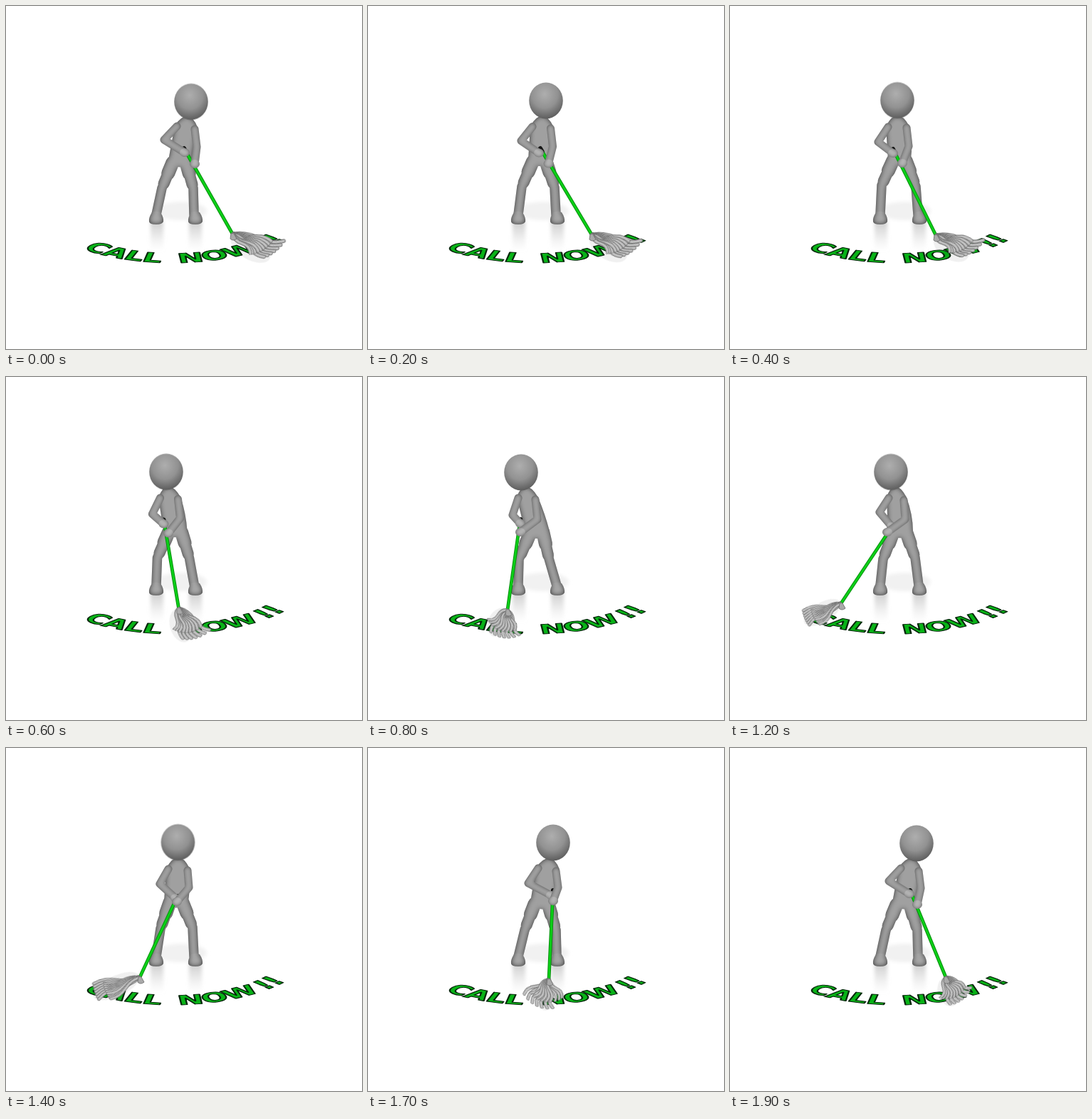
Animation of 500 by 482 pixels, one loop 2 s. Source, as an HTML page without scripts:

```html
<!DOCTYPE html>
<html lang="en">
<head>
<meta charset="utf-8">
<title>Call now</title>
<style>
html, body { margin: 0; width: 100%; height: 100%; overflow: hidden; background: #fff; }
svg { display: block; width: 100%; height: 100%; }
path { fill: none; stroke-linecap: round; stroke-linejoin: round; }

.floor { font: bold 44px "DejaVu Sans", sans-serif; fill: #08b317; stroke: #04260a; stroke-width: 2.4; stroke-linejoin: round; }

/* every 100 ms is one held pose */
.head, .mop, .handle { animation: 2s steps(2) infinite; }
.torso, .leg, .arm, .strand { animation: 2s steps(4) infinite; }

.solid { filter: url(#round); }
.torso { fill: #a0a0a0; stroke: #a0a0a0; stroke-width: 6; animation-name: torso; }
.leg { stroke: #a0a0a0; stroke-width: 13.5; }
.thigh { stroke-width: 16; stroke-dasharray: 32 200; }
.hip { stroke-width: 19; stroke-dasharray: 16 200; }
.leg.left { animation-name: legLeft; }
.leg.right { animation-name: legRight; }
.arm { stroke: #a0a0a0; stroke-width: 11; marker-end: url(#hand); filter: url(#roundArm); }
.arm.left { animation-name: armLeft; }
.arm.right { animation-name: armRight; }
.head { animation-name: head; }

.handle { stroke: #078a0c; stroke-width: 4.8; animation-name: handle; }
.handle.shine { stroke: #0bcf17; stroke-width: 3; }
.handle.grip { stroke: #151515; stroke-width: 6; stroke-dasharray: 5 400; }
.mop { animation-name: mop; }
.strand { animation-name: sweep; }

@keyframes head {
  0%, 100% { transform: translate(260px, 134.5px); }
  10% { transform: translate(250px, 133px); }
  20% { transform: translate(235px, 132.5px); animation-timing-function: steps(4); }
  40% { transform: translate(215px, 134px); }
  50% { transform: translate(218px, 134px); }
  60% { transform: translate(226px, 133.5px); }
  70% { transform: translate(241.5px, 132.5px); animation-timing-function: steps(3); }
  85% { transform: translate(260px, 133px); }
  95% { transform: translate(262px, 134px); animation-timing-function: steps(1); }
}
@keyframes mop {
  0%, 100% { transform: translate(318px, 320px); }
  10% { transform: translate(314px, 321px); }
  20% { transform: translate(289px, 322px); animation-timing-function: steps(4); }
  40% { transform: translate(196px, 327px); }
  50% { transform: translate(164px, 321px); }
  60% { transform: translate(156px, 318px); }
  70% { transform: translate(188px, 322px); animation-timing-function: steps(3); }
  85% { transform: translate(254px, 325px); }
  95% { transform: translate(303px, 322px); animation-timing-function: steps(1); }
}
@keyframes handle {
  0%, 100% { d: path("M250 200L318 320"); }
  10% { d: path("M242 200L314 321"); }
  20% { d: path("M229 201L289 322"); animation-timing-function: steps(4); }
  40% { d: path("M214 200L196 327"); }
  50% { d: path("M220 203L164 321"); }
  60% { d: path("M229 208L156 318"); }
  70% { d: path("M241 208L188 322"); animation-timing-function: steps(3); }
  85% { d: path("M260 200L254 325"); }
  95% { d: path("M253 200L303 322"); animation-timing-function: steps(1); }
}
/* --i is a strand's place in the fan, -1 to 1 */
@keyframes sweep {
  0%, 100% { transform: rotate(calc(26deg + var(--i) * 18deg)) scale(calc(.88 - var(--i) * .16), 1); }
  20% { transform: rotate(calc(26deg + var(--i) * 20deg)) scale(calc(.78 - var(--i) * .18), 1); }
  40% { transform: rotate(calc(105deg + var(--i) * 40deg)) scale(.56, .9); }
  60% { transform: rotate(calc(154deg - var(--i) * 15deg)) scale(.77, .8); animation-timing-function: steps(2); }
  70% { transform: rotate(calc(159deg - var(--i) * 13deg)) scale(.93, .85); animation-timing-function: steps(3); }
  85% { transform: rotate(calc(106deg - var(--i) * 43deg)) scale(.58, .9); animation-timing-function: steps(2); }
  95% { transform: rotate(calc(60deg + var(--i) * 37deg)) scale(.55, .9); animation-timing-function: steps(1); }
}
@keyframes torso {
  0%, 100% { d: path("M240 169Q256 146 266 171Q262 194 257 218Q243 229 231 217Z"); }
  20% { d: path("M222 170Q235 144 249 170Q254 192 251 215Q238 226 225 216Z"); }
  40% { d: path("M212 169Q221 145 236 170Q246 194 252 217Q238 230 224 218Z"); }
  60% { d: path("M223 169Q232 145 245 170Q254 194 254 217Q240 229 225 218Z"); animation-timing-function: steps(2); }
  70% { d: path("M228 170Q242 144 255 170Q256 194 253 216Q239 227 225 216Z"); animation-timing-function: steps(3); }
  85% { d: path("M239 169Q256 146 266 171Q263 194 257 218Q243 229 231 217Z"); animation-timing-function: steps(2); }
  95% { d: path("M240 169Q256 146 266 171Q262 194 257 218Q243 229 231 217Z"); animation-timing-function: steps(1); }
}
@keyframes legLeft {
  0%, 100% { d: path("M234 220L219 256L211 293"); }
  20% { d: path("M229 217L213 252L211 293"); }
  40% { d: path("M228 219L212 256L211 293"); }
  60% { d: path("M229 219L215 256L211 293"); animation-timing-function: steps(2); }
  70% { d: path("M230 217L217 254L211 293"); animation-timing-function: steps(3); }
  85% { d: path("M234 219L220 256L211 293"); animation-timing-function: steps(2); }
  95% { d: path("M234 220L219 256L211 293"); animation-timing-function: steps(1); }
}
@keyframes legRight {
  0%, 100% { d: path("M253 220L263 256L264 293"); }
  20% { d: path("M247 217L261 254L264 293"); }
  40% { d: path("M246 219L254 255L265 293"); }
  60% { d: path("M248 219L260 254L265 293"); animation-timing-function: steps(2); }
  70% { d: path("M248 217L262 252L264 293"); animation-timing-function: steps(3); }
  85% { d: path("M253 219L264 256L265 293"); animation-timing-function: steps(2); }
  95% { d: path("M253 220L263 256L264 293"); animation-timing-function: steps(1); }
}
@keyframes armLeft {
  0%, 100% { d: path("M240 169L222 188L251 206"); }
  20% { d: path("M222 170L208 191L229 207"); }
  40% { d: path("M211 170L203 194L214 206"); }
  60% { d: path("M223 170L210 190L227 210"); animation-timing-function: steps(2); }
  70% { d: path("M228 170L216 191L238 211"); animation-timing-function: steps(3); }
  85% { d: path("M239 169L225 190L257 207"); animation-timing-function: steps(2); }
  95% { d: path("M240 169L223 187L252 205"); animation-timing-function: steps(1); }
}
@keyframes armRight {
  0%, 100% { d: path("M265 173L268 198L265 222"); }
  20% { d: path("M248 171L251 197L242 221"); }
  40% { d: path("M235 172L238 200L214 218"); }
  60% { d: path("M244 173L246 200L221 218"); animation-timing-function: steps(2); }
  70% { d: path("M255 172L257 196L240 216"); animation-timing-function: steps(3); }
  85% { d: path("M264 173L267 196L260 215"); animation-timing-function: steps(2); }
  95% { d: path("M265 173L268 197L263 220"); animation-timing-function: steps(1); }
}
</style>
</head>
<body>
<svg viewBox="0 0 500 482">
  <defs>
    <radialGradient id="ball" cx=".46" cy=".32" r=".7">
      <stop offset="0" stop-color="#aeaeae"/>
      <stop offset=".55" stop-color="#929292"/>
      <stop offset="1" stop-color="#5a5a5a"/>
    </radialGradient>
    <linearGradient id="fade" x2="0" y2="1">
      <stop offset="0" stop-color="#bbb" stop-opacity=".75"/>
      <stop offset="1" stop-color="#ddd" stop-opacity="0"/>
    </linearGradient>
    <!-- darkens edges so flat limbs look round -->
    <filter id="round" filterUnits="userSpaceOnUse" x="185" y="100" width="115" height="215" color-interpolation-filters="sRGB">
      <feGaussianBlur in="SourceAlpha" stdDeviation="3.6"/>
      <feComponentTransfer><feFuncA type="table" tableValues=".8 .34 0"/></feComponentTransfer>
      <feComposite in2="SourceAlpha" operator="in" result="edge"/>
      <feMerge><feMergeNode in="SourceGraphic"/><feMergeNode in="edge"/></feMerge>
    </filter>
    <filter id="roundArm" filterUnits="userSpaceOnUse" x="185" y="150" width="115" height="90" color-interpolation-filters="sRGB">
      <feGaussianBlur in="SourceAlpha" stdDeviation="2.4"/>
      <feComponentTransfer><feFuncA type="table" tableValues=".6 .26 0"/></feComponentTransfer>
      <feComposite in2="SourceAlpha" operator="in" result="edge"/>
      <feMerge><feMergeNode in="SourceGraphic"/><feMergeNode in="edge"/></feMerge>
    </filter>
    <filter id="soft" x="-30%" y="-30%" width="160%" height="160%"><feGaussianBlur stdDeviation="2.5"/></filter>
    <marker id="hand" markerUnits="userSpaceOnUse" markerWidth="16" markerHeight="16" viewBox="-8 -8 16 16">
      <ellipse rx="7" ry="6" fill="#b4b4b4"/>
    </marker>
    <path id="arc" d="M-196 0A196 196 0 0 0 196 0"/>
    <path id="foot" d="M-6 -8Q0 -11 6 -8Q11 0 10 5Q8 9 0 9Q-9 9 -10 5Q-11 0 -6 -8Z" style="fill:#a6a6a6"/>
    <g id="lock">
      <path d="M2 0Q18 -5 36 1T70 0" stroke="#6c6c6c" stroke-width="5.4"/>
      <path d="M2 0Q18 -5 36 1T70 0" stroke="#c2c2c2" stroke-width="3.4"/>
    </g>
    <g id="short"><use href="#lock" transform="scale(.78 -.95)"/></g>
  </defs>

  <g filter="url(#soft)">
    <ellipse cx="246" cy="288" rx="36" ry="13" fill="#f1f1f1"/>
    <rect x="203" y="303" width="18" height="42" fill="url(#fade)"/>
    <rect x="257" y="303" width="18" height="42" fill="url(#fade)"/>
  </g>

  <g class="floor" transform="translate(240 278.5) rotate(-1) scale(1 .42)">
    <text><textPath href="#arc" startOffset="161">CALL <tspan dx="10">NOW </tspan><tspan dx="-5">!!</tspan></textPath></text>
  </g>

  <g class="solid">
    <path class="leg left"/><path class="leg left thigh"/><path class="leg left hip"/>
    <path class="leg right"/><path class="leg right thigh"/><path class="leg right hip"/>
    <use href="#foot" x="211" y="298"/>
    <use href="#foot" x="266" y="298"/>
    <path class="torso"/>
  </g>

  <path class="handle"/>
  <path class="handle shine"/>
  <path class="handle grip"/>

  <path class="arm left"/>
  <path class="arm right"/>
  <g class="head"><ellipse rx="23.8" ry="25.4" fill="url(#ball)"/></g>

  <g class="mop">
    <ellipse class="strand" style="--i:.3" cx="38" cy="3" rx="38" ry="17" fill="#000" opacity=".06"/>
    <use class="strand" href="#lock" style="--i:-1"/>
    <use class="strand" href="#lock" style="--i:-.72"/>
    <use class="strand" href="#short" style="--i:-.86"/>
    <use class="strand" href="#lock" style="--i:-.45"/>
    <use class="strand" href="#lock" style="--i:-.2"/>
    <use class="strand" href="#short" style="--i:-.58"/>
    <use class="strand" href="#lock" style="--i:.05"/>
    <use class="strand" href="#short" style="--i:-.32"/>
    <use class="strand" href="#lock" style="--i:.3"/>
    <use class="strand" href="#short" style="--i:-.05"/>
    <use class="strand" href="#lock" style="--i:.55"/>
    <use class="strand" href="#short" style="--i:.2"/>
    <use class="strand" href="#short" style="--i:.75"/>
    <use class="strand" href="#short" style="--i:.45"/>
    <use class="strand" href="#short" style="--i:1"/>
    <use class="strand" href="#short" style="--i:1.2"/>
    <path d="M-2 0L-3 7Q1 11 6 7L2 0Z" style="fill:#a9a9a9" stroke="#777"/>
  </g>
</svg>
</body>
</html>
```
